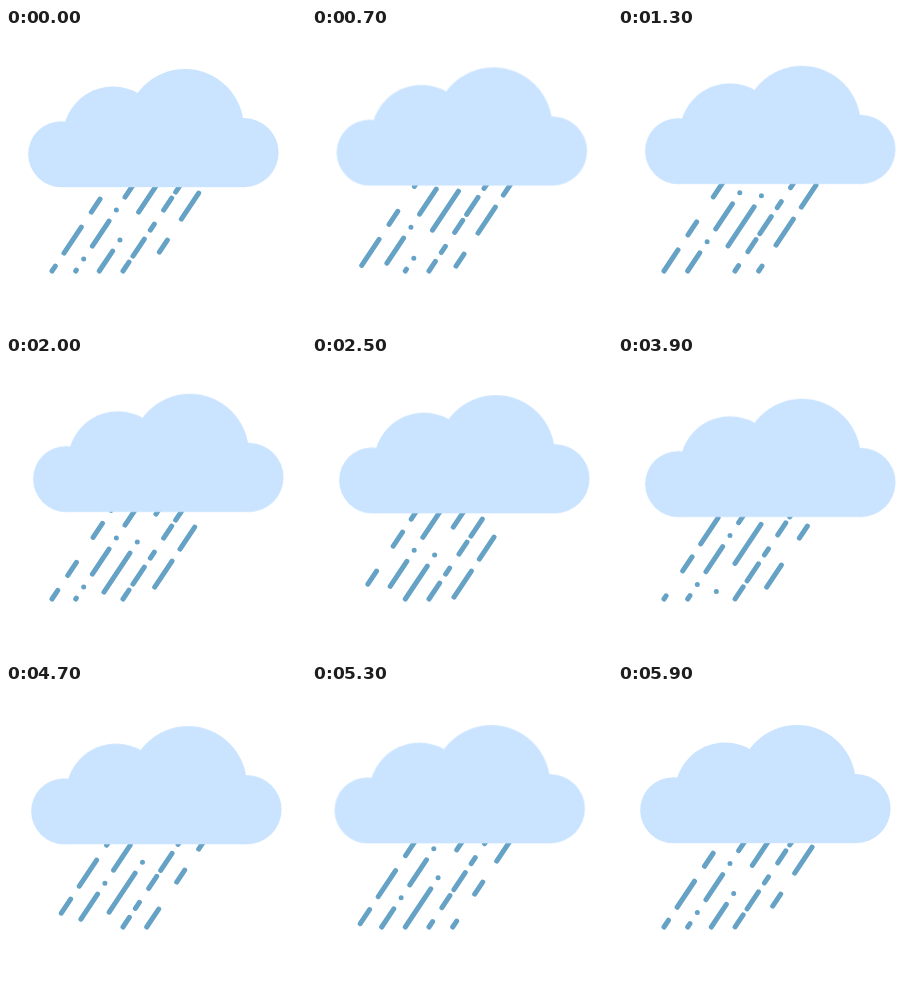
An HTML page without scripts for the animation above (6000 ms loop, 300x300 px).

```html
<!DOCTYPE html>
<html lang="en">
<head>
<meta charset="utf-8">
<title>Rain cloud</title>
<style>
  html, body { margin: 0; width: 100%; height: 100%; overflow: hidden; background: #fff; }
  svg { display: block; width: 100vw; height: 100vh; }

  .rain { fill: none; stroke: #65a2c5; stroke-width: 5; stroke-linecap: round; }
  .rain path { animation: fall var(--time) linear infinite; }

  .cloud { fill: #cae4ff; animation: drift 6s ease-in-out infinite; }

  /* --offset: dash phase at the start, --period: length of one dash pattern */
  @keyframes fall {
    from { stroke-dashoffset: var(--offset); }
    to { stroke-dashoffset: calc(var(--offset) - var(--period)); }
  }

  @keyframes drift {
    0% { transform: translate(0, 0); }
    23.3%, 33.3% { transform: translate(4.9px, -3.2px); }
    56.7%, 66.7% { transform: translate(4.9px, 1.8px); }
    93.3%, 100% { transform: translate(0, 0); }
  }
</style>
</head>
<body>
<svg viewBox="0 0 300 300">
  <!-- pathLength equals the drop in height, so dashes are measured vertically -->
  <g class="rain">
    <path d="M126 123l-80 120" pathLength="120" stroke-dasharray="14 25 13 15 26 13"
          style="--period:106px; --offset:97px; --time:6s"/>
    <path d="M149.7 123l-80 120" pathLength="120" stroke-dasharray="0 11 25 13"
          style="--period:49px; --offset:39px; --time:2s"/>
    <path d="M173.3 123l-80 120" pathLength="120" stroke-dasharray="39 28 0 11"
          style="--period:78px; --offset:56px; --time:3s"/>
    <path d="M197 123l-80 120" pathLength="120" stroke-dasharray="12 14 6 9 17 6"
          style="--period:64px; --offset:17px; --time:2s"/>
    <path d="M220.7 123l-80 120" pathLength="120" stroke-dasharray="22 12 26 21 12 27"
          style="--period:120px; --offset:112px; --time:6s"/>
  </g>
  <g class="cloud">
    <circle cx="55.2" cy="126.2" r="33"/>
    <circle cx="107" cy="108.5" r="50"/>
    <circle cx="179" cy="99.8" r="58.8"/>
    <circle cx="238" cy="124.6" r="34.6"/>
    <rect x="55" y="110" width="183" height="49.2"/>
  </g>
</svg>
</body>
</html>
```
